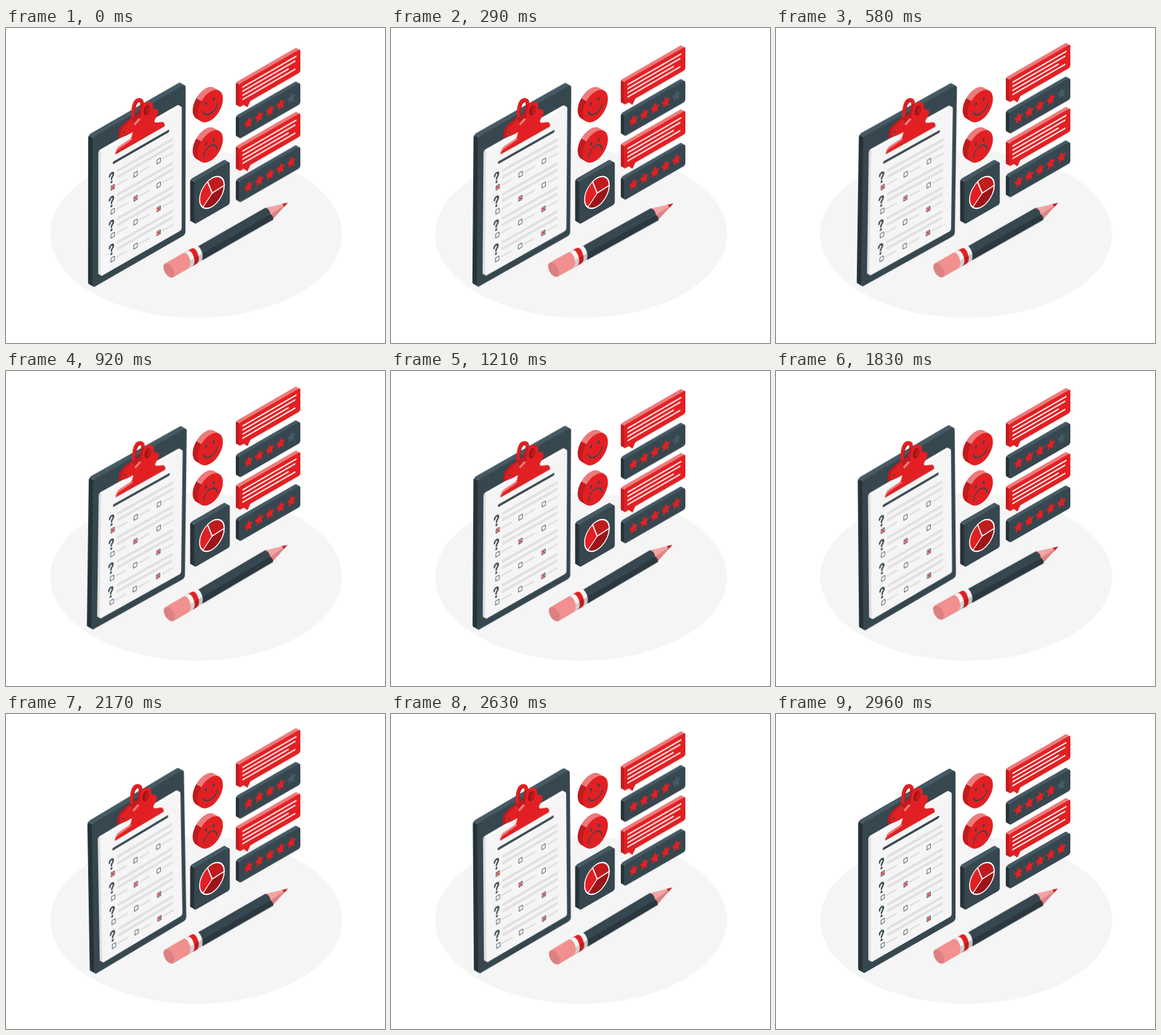
An HTML page without scripts that plays this animation: 600x500 px, repeating every 3000 ms.

```html
<!DOCTYPE html>
<html lang="en">
<head>
<meta charset="utf-8">
<title>Survey</title>
<style>
  html, body { margin: 0; width: 100%; height: 100%; overflow: hidden; background: #fff; }
  svg { display: block; width: 600px; height: 500px; }
  :root { --red: #e22023; --deep: #c01b1e; --wine: #9c1518; --pink: #ee7a7b;
          --slate: #37474f; --night: #263238; --steel: #455a64; }
  .red { fill: var(--red); } .deep { fill: var(--deep); } .wine { fill: var(--wine); } .pink { fill: var(--pink); }
  .slate { fill: var(--slate); } .night { fill: var(--night); } .steel { fill: var(--steel); }
  .line { fill: none; stroke: var(--slate); stroke-linecap: round; stroke-linejoin: round; }
  .star { stroke-width: 1; stroke-linejoin: round; }
  .on { fill: var(--red); stroke: var(--red); }
  .off { fill: var(--steel); stroke: var(--steel); }
  .board { transform-origin: 207px 248.5px; animation: sway 3s linear -40ms infinite; }
  .pencil { transform-origin: 347.5px 337px; animation: sway 1.5s linear -40ms infinite; }
  .cards { animation: lift 1.5s linear -40ms infinite; }
  @keyframes sway { 25% { transform: rotate(1deg); } 75% { transform: rotate(-1deg); } }
  @keyframes lift { 50% { transform: translateY(-10px); } }
</style>
</head>
<body>
<svg viewBox="0 0 600 500">
  <defs>
    <g id="disc">
      <path class="deep" d="M-16.3-16.3l-9.3-9.3A23 23 0 0 0-25.600 7l9.3 9.3z"/>
      <path class="pink" d="M16.3-16.3l-9.3-9.3A23 23 0 0 0-25.600-25.600l9.3 9.3z"/>
      <circle class="red" r="23"/>
      <ellipse class="slate" cx="-8" cy="-8" rx="1.9" ry="2.8"/>
      <ellipse class="slate" cx="6" cy="-8" rx="1.9" ry="2.8"/>
    </g>
    <path id="star" d="M0-8L2.3-3.2 7.6-2.5 3.7 1.2 4.7 6.5 0 3.9-4.7 6.5-3.7 1.2-7.6-2.5-2.3-3.2z"/>
    <g id="bubble">
      <path class="deep" d="M6 34L15 44 21 36z"/>
      <path class="deep" d="M1 1l-6-6Q-6-5-6-3V28Q-6 30-5 30.500L1 36z"/>
      <path class="pink" d="M111 1l-6-6Q104-6 103-6H-3Q-4-6-5-5L1 1z"/>
      <rect class="red" width="112" height="37" rx="3"/>
      <path class="red" d="M10 36L15.500 44 21 36z"/>
      <path d="M7 8H104M7 14.500H102M7 21H90M7 27.500H102" fill="none" stroke="#fff" stroke-width="2.200" stroke-linecap="round"/>
    </g>
    <g id="plate">
      <path class="night" d="M1.200 1.200l-6-6Q-6-4-6-2V24Q-6 26-4.800 26.800L1.200 32.800z"/>
      <path class="steel" d="M110.800 1.200l-6-6Q104-6 102-6H-2Q-4-6-4.800-4.800L1.200 1.200z"/>
      <rect class="slate" width="112" height="34" rx="4"/>
      <g class="star on">
        <use href="#star" x="17.300" y="17"/><use href="#star" x="36.900" y="17"/>
        <use href="#star" x="56.500" y="17"/><use href="#star" x="76.100" y="17"/>
      </g>
    </g>
    <g id="option">
      <rect class="line" x="-3.300" y="-3.300" width="6.600" height="6.600" rx=".8"/>
      <path d="M7 0H26" stroke="#e0e0e0" stroke-width="3"/>
    </g>
    <path id="tick" d="M-2.200-2.200L2.200 2.200M2.200-2.200L-2.200 2.200" stroke="#e22023" stroke-width="1.500"/>
    <g id="question">
      <path d="M30 44H131.600M30 54H131.600" stroke="#e0e0e0" stroke-width="4.500"/>
      <path class="line" stroke-width="3" d="M16.200 46C16 41 23.400 41 23 45.500C22.700 48.500 19.700 48.300 19.700 51.700"/>
      <circle class="slate" cx="19.700" cy="56.300" r="1.900"/>
      <use href="#option" x="22" y="66"/><use href="#option" x="63.700" y="66"/><use href="#option" x="106" y="66"/>
    </g>
  </defs>

  <ellipse cx="301" cy="327" rx="231" ry="133" fill="#f5f5f5"/>

  <g class="board">
    <g transform="matrix(.866 -.5 0 1 137 173.800)">
      <path class="night" d="M1.500 1.500l-8-8Q-8-5-8-3V226Q-8 229-6.500 229.500L1.500 237.500 5 239V5z"/>
      <path class="steel" d="M168.500 1.500l-8-8Q159-8 157-8H-3Q-5-8-6.500-6.500L1.500 1.500z"/>
      <rect class="slate" width="170" height="239" rx="5"/>
    </g>
    <g transform="matrix(.866 -.5 0 1 150 197)">
      <path fill="#e0e0e0" d="M1.200 1.200l-4.500-4.500Q-4.500-2.500-4.500-.5V190Q-4.500 192-3.300 192.300L1.200 196.800 4 198V4z"/>
      <path fill="#fff" d="M146.800 1.200l-4.500-4.500Q141.500-4.500 139.500-4.500H-.5Q-2.500-4.500-3.300-3.300L1.200 1.200z"/>
      <rect width="148" height="197.500" rx="4" fill="#f5f5f5"/>
    </g>
    <g transform="matrix(.866 -.5 0 1 150 198)">
      <path class="line" d="M24 27.500H123" stroke-width="4.200"/>
      <use href="#question"/><use href="#question" y="38"/>
      <use href="#question" y="76"/><use href="#question" y="114"/>
      <use href="#tick" x="22" y="66"/><use href="#tick" x="63.700" y="104"/>
      <use href="#tick" x="106" y="142"/><use href="#tick" x="106" y="180"/>
    </g>
    <!-- clip -->
    <path class="deep" d="M177 176L178 164Q181 156 187 151L199 142 217 132 215 150 201 165 192 170Z"/>
    <path class="red" d="M181 172L183 161 199 144 203 152 200 165 191 170Z"/>
    <path d="M201.500 145C200.500 124 204 115.500 211 114.500C217 114.500 216 123 212 136" fill="none" stroke="#c01b1e" stroke-width="6"/>
    <path d="M200.500 142C200 122 204 114 210 113.500C214 113.500 216 116 215 121" fill="none" stroke="#e22023" stroke-width="4.500"/>
    <circle class="slate" cx="187" cy="165.500" r="1.600"/>
    <path class="red" d="M173 201Q173 195 178 191L195 179Q199 175 200 168L203 154 212 146Q214 137 215 127C217 118 227 114 231 119Q233 122 232 128L239 129Q242 132 240 137L235 147Q235 151 239 150L248 149Q252 151 251 156Z"/>
    <ellipse class="wine" cx="223" cy="130.500" rx="5" ry="8.500" transform="rotate(18 223 130.500)"/>
    <ellipse class="deep" cx="225" cy="130" rx="2.800" ry="6.500" transform="rotate(18 225 130)"/>
    <path class="pink" d="M174 196Q175 190 180 187L195 177 198 174 200 177 179 192Q176 194 174 198zM202 152L210 143 213 145 204 155z"/>
  </g>

  <g transform="matrix(.866 -.5 0 1 323.500 124)">
    <use href="#disc"/>
    <path class="line" stroke-width="2" d="M-12.500 3A13 11 0 0 0 13 3"/>
  </g>
  <g transform="matrix(.866 -.5 0 1 323.500 188)">
    <use href="#disc"/>
    <path class="line" stroke-width="2" d="M-12 11A12 12 0 0 1 12 11"/>
  </g>

  <g transform="matrix(.866 -.5 0 1 298 244)">
    <path class="night" d="M1.200 1.200l-7.500-7.500Q-7.500-5.500-7.500-3.500V57Q-7.500 59-6.300 59.300L1.200 66.800 4 68V4z"/>
    <path class="steel" d="M63.800 1.200l-7.500-7.500Q55.500-7.500 53.500-7.500H-3.500Q-5.500-7.500-6.300-6.300L1.200 1.200z"/>
    <rect class="slate" width="65" height="68" rx="4"/>
    <g transform="translate(32.300 33.200)" stroke="#fff" stroke-width="1.800" stroke-linejoin="round">
      <circle class="red" r="22.500"/>
      <path class="deep" d="M.5 1.300L-7.900-21.100A22.500 22.500 0 0 1 22.500 0z"/>
      <path class="wine" d="M.5 1.300L22.500 0A22.500 22.500 0 0 1-16.500 15.300z"/>
    </g>
  </g>

  <g class="cards">
    <use href="#plate" transform="matrix(.866 -.5 0 1 369 143)"/>
    <use href="#star" class="star off" transform="matrix(.866 -.5 0 1 451.900 112.200)"/>
    <use href="#bubble" transform="matrix(.866 -.5 0 1 369 89.700)"/>
    <use href="#plate" transform="matrix(.866 -.5 0 1 369 244.300)"/>
    <use href="#star" class="star on" transform="matrix(.866 -.5 0 1 451.900 213.500)"/>
    <use href="#bubble" transform="matrix(.866 -.5 0 1 369 191.200)"/>
  </g>

  <g class="pencil">
    <g transform="translate(258 385) rotate(-30)">
      <path fill="#f4a3a3" d="M182-10L217 .5 182 5z"/>
      <path fill="#dc8485" d="M182 12L217 .5 182 3z"/>
      <path class="deep" d="M208-2.300L217 .5 208 3.500Q209.500 .5 208-2.300z"/>
      <path class="slate" d="M54-10.300H182Q187-5 184 3V12.200H54z"/>
      <path fill="#2c383f" d="M54 3H184Q187 8 183 12.200H54z"/>
      <g transform="skewX(-12)">
        <path fill="#f5f5f5" d="M3-12.300H53A7 12.400 0 0 1 53 12.500H3z"/>
        <path fill="#c4c4c4" d="M3 3H59.900Q58.500 12.500 53 12.500H3z"/>
        <path class="red" d="M3-12.300H46A7 12.400 0 0 1 46 12.500H3z"/>
        <path class="deep" d="M3 3H52.900Q51.500 12.500 46 12.500H3z"/>
        <path fill="#f5f5f5" d="M3-12.300H38A7 12.400 0 0 1 38 12.500H3z"/>
        <path fill="#d2d2d2" d="M3 3H44.900Q43.500 12.500 38 12.500H3z"/>
        <path fill="#f28f8f" d="M3-12.400H31A7 12.400 0 0 1 31 12.500H3z"/>
      </g>
      <path fill="#f28f8f" d="M0-12.500H8V12.500H0z"/>
      <ellipse rx="7" ry="12.500" fill="#dc8081"/>
    </g>
  </g>
</svg>
</body>
</html>
```
